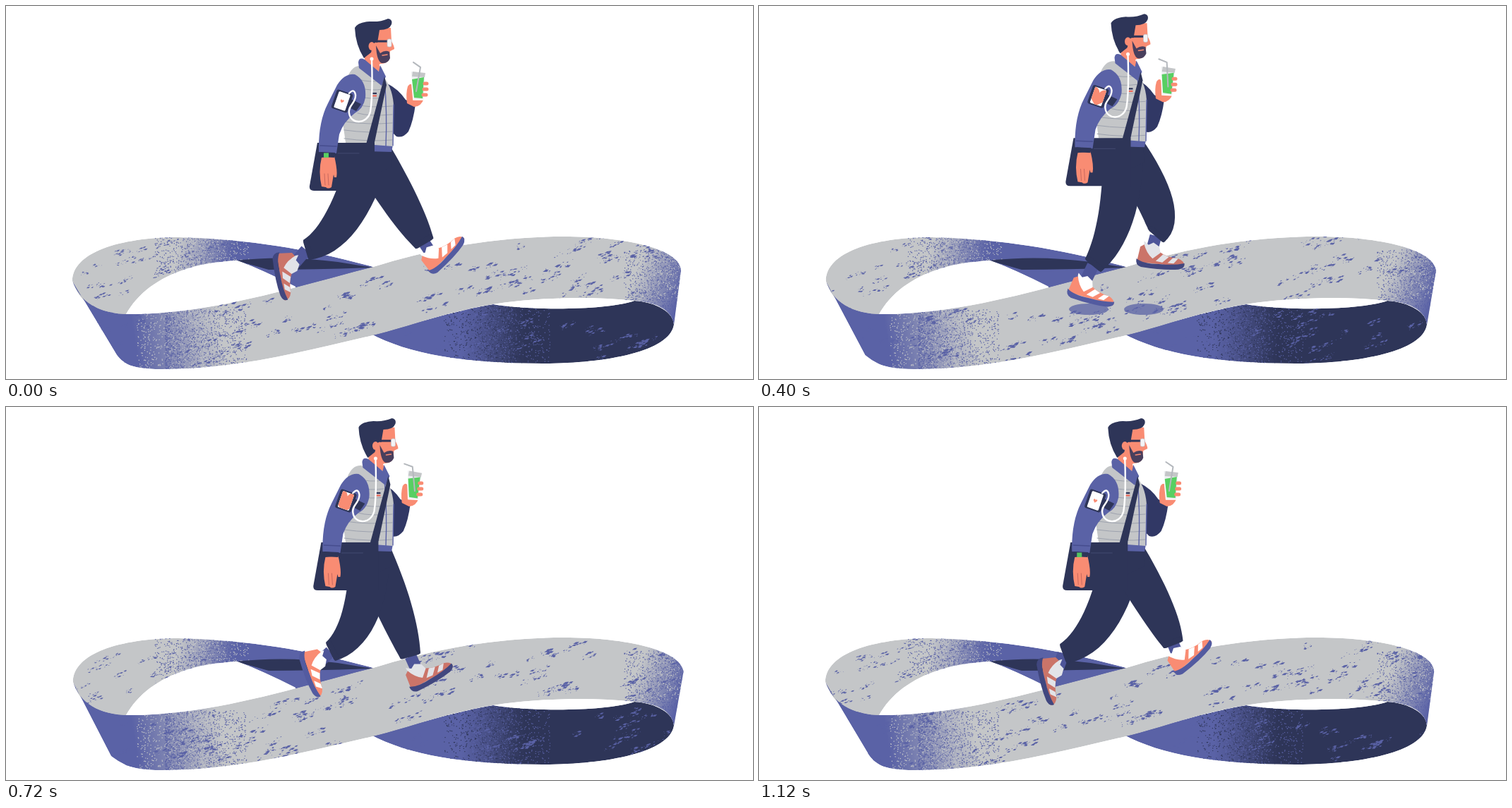
Write an HTML page that moves like this. It is 1058x529 px and loops after 1200 ms.

```html
<!DOCTYPE html>
<html lang="en">
<head>
<meta charset="utf-8">
<title>Endless walk</title>
<style>
  html, body { margin: 0; width: 100%; height: 100%; overflow: hidden; background: #fff; }
  svg { display: block; width: 100vw; height: 100vh; }
  .navy { fill: #2e3558; }
  .purple { fill: #5a62a6; }
  .skin { fill: #f98c73; }
  .line { fill: none; stroke-linecap: round; stroke-linejoin: round; }
</style>
</head>
<body>
<svg viewBox="0 0 1058 529">
  <defs>
    <clipPath id="backClip"><path class="back"/></clipPath>
    <clipPath id="underClip"><path class="under"/></clipPath>
    <clipPath id="frontClip"><path class="front"/></clipPath>
    <clipPath id="screen"><rect x="-8.5" y="-12" width="17" height="24" rx="1.5"/></clipPath>
    <linearGradient id="backFill" gradientUnits="userSpaceOnUse" x1="245" y1="335" x2="325" y2="350">
      <stop offset="0" stop-color="#c4c6c8"/><stop offset="1" stop-color="#5a62a6"/>
    </linearGradient>
    <linearGradient id="underFill" gradientUnits="userSpaceOnUse" x1="645" y1="0" x2="735" y2="0">
      <stop offset="0" stop-color="#5a62a6"/><stop offset="1" stop-color="#2e3558"/>
    </linearGradient>
    <linearGradient id="frontFill" gradientUnits="userSpaceOnUse" x1="185" y1="490" x2="305" y2="470">
      <stop offset="0" stop-color="#5a62a6"/><stop offset="1" stop-color="#c4c6c8"/>
    </linearGradient>
    <linearGradient id="rightFill" gradientUnits="userSpaceOnUse" x1="890" y1="385" x2="956" y2="412">
      <stop offset="0" stop-color="#5a62a6" stop-opacity="0"/><stop offset="1" stop-color="#5a62a6"/>
    </linearGradient>
  </defs>

  <g clip-path="url(#backClip)">
    <path class="back" fill="url(#backFill)"/>
    <g id="backMarks"/>
    <path class="navy" d="M326 361Q395 353 470 363L520 371Q440 374 372 374Z"/>
  </g>
  <g clip-path="url(#underClip)">
    <path class="under" fill="url(#underFill)"/>
    <g id="underMarks"/>
  </g>
  <g clip-path="url(#frontClip)">
    <path class="front" fill="url(#frontFill)"/>
    <rect x="860" y="320" width="110" height="150" fill="url(#rightFill)"/>
    <g id="frontMarks"/>
  </g>

  <g class="purple" opacity=".75">
    <ellipse class="shadow"/><ellipse class="shadow"/>
  </g>

  <g id="farArm">
    <path d="M540 110Q556 118 566 133L580 139Q577 163 570 178Q562 188 553 185L546 178Z" fill="#313865"/>
    <path class="skin" d="M569 114Q573 108 576 113L577 132L592 131Q588 143 578 143L568 138Q566 124 569 114Z"/>
    <g id="glass">
      <path d="M573 92L594 95L592 133H577Z" fill="#eceef0" stroke="#fff" stroke-width="1.5"/>
      <path d="M576 93L594 95L593 101L575 100Z" fill="#c4c6c8"/>
      <path d="M575 104L592 101L590 131L578 130Z" fill="#58cf62"/>
      <path id="straw" class="line" d="M577 80L587 87L581 121" stroke="#b4b8bd" stroke-width="2"/>
    </g>
    <g class="line" stroke="#f98c73" stroke-width="5">
      <path d="M593 110h3M592 118h4M591 126h4"/>
    </g>
  </g>

  <g id="legs"/>

  <g id="trunk">
    <path class="navy" d="M500 200L544 203L546 228L500 250Z"/>
    <path class="purple" d="M500 196L548 197L546 207L512 206Z"/>
    <path d="M484 100Q491 84 503 85L530 95Q547 112 549 140L548 199L481 194L477 165Z" fill="#c4c6c8"/>
    <g class="line" stroke="#9da2ae" stroke-width="1">
      <path id="quilt"/>
    </g>
    <path class="line" d="M536 105Q540 150 538 199M549 140L548 198" stroke="#5a62a6" stroke-width="1.4"/>
  </g>

  <g id="upper">
    <path class="skin" d="M508 68L530 66L528 82L534 96L508 82Z"/>
    <path class="purple" d="M499 80Q500 72 508 76L528 93L530 84L538 100L532 113L500 88Z"/>
    <path class="skin" d="M515 55L528 31L545 31L546 50Q550 57 550 61L544 64L543 74Q541 82 530 82L524 87L510 74Z"/>
    <path d="M524 56L530 67Q537 62 543 65L544 74Q541 82 532 81Q525 78 524 56Z" fill="#493f5d"/>
    <path class="line" d="M533 70l7 -1" stroke="#f98c73" stroke-width="1.5"/>
    <path class="navy" d="M494 31Q498 23 515 22Q530 23 541 18Q548 19 546 26Q543 34 529 34L526 52Q521 50 519 58L517 66L507 74Q495 55 494 31Z"/>
    <ellipse class="skin" cx="518" cy="57" rx="4.5" ry="6"/>
    <path class="line" d="M525 50H542" stroke="#2e3558" stroke-width="3"/>
    <rect x="540" y="47" width="6" height="11" rx="2" fill="#f4f4f6" stroke="#bfc3cf" stroke-width=".7"/>

    <path d="M518 124h7" stroke="#2e3558" stroke-width="2.2"/>
    <path d="M517 127.5h8" stroke="#f2604f" stroke-width="2"/>
    <path class="navy" d="M441 194H522V262H436Q429 262 430 255Z"/>
    <path class="line" d="M470 209H500" stroke="#434a70" stroke-width="1"/>
    <path class="navy" d="M536 100L539 112L521 198L510 196Z"/>

    <path class="skin" d="M447 215L465 213Q470 234 468 243L465 243L464 239L461 257Q456 260 453 257L447 256Q442 235 447 215Z"/>
    <path class="line" d="M451 238L452 254M456 238L457 254" stroke="#c9695f" stroke-width="1"/>
    <path class="purple" d="M469 112Q480 95 494 97Q511 106 509 130Q506 146 494 152Q478 164 472 182L468 209L443 207Q442 165 456 138Z"/>
    <path class="line" d="M445 198L468 199" stroke="#464d8e" stroke-width="1.5"/>
    <path class="navy" d="M445 207L466 208L465 215L446 214Z"/>
    <rect id="watch" x="450" y="208.5" width="7" height="6.5" fill="#58cf62"/>
    <path class="navy" d="M484 130L503 139L496 149L482 142Z"/>
    <g transform="translate(476 135) rotate(19)">
      <rect class="navy" x="-12" y="-14" width="24" height="28" rx="3"/>
      <g clip-path="url(#screen)">
        <rect x="-9" y="-13" width="18" height="26" fill="#fff"/>
        <path id="heart" class="skin" d="M0 .5C-.2 .3-.5 .1-.5-.15C-.5-.5-.1-.5 0-.2C.1-.5.5-.5.5-.15C.5 .1 .2 .3 0 .5Z"/>
      </g>
    </g>
    <path class="line" d="M518 76C519 105 519 132 516 150C511 169 488 168 486 152C484 141 496 138 495 126Q493 116 486 124" stroke="#fff" stroke-width="2.4"/>
    <circle cx="518" cy="75" r="2.5" fill="#fff"/>
  </g>
</svg>

<script>
const LOOP = 1200, STEP = 80, LAP = 720;
const $ = id => document.getElementById(id);

function add(parent, tag, attrs = {}) {
  const node = document.createElementNS('http://www.w3.org/2000/svg', tag);
  for (const k in attrs) node.setAttribute(k, attrs[k]);
  return parent.appendChild(node);
}
const setD = (cls, d) => document.querySelectorAll('.' + cls).forEach(n => n.setAttribute('d', d));
const move = (node, x, y, rest = '') => node.setAttribute('transform', `translate(${x} ${y}) ${rest}`);
const wrap = (v, n) => ((v % n) + n) % n;

let seed = 7;
function rnd() {
  seed = (seed * 16807) % 2147483647;
  return seed / 2147483647;
}
const spread = n => (rnd() - .5) * n;

// Stippled shading: n specks placed by at()
function grain(parent, n, fill, at) {
  let d = '';
  for (let i = 0; i < n; i++) {
    const [x, y] = at();
    d += `M${x.toFixed(1)} ${y.toFixed(1)}h1.2v1.2h-1.2z`;
  }
  add(parent, 'path', { d, fill });
}

const GREY = '#c4c6c8', PURPLE = '#5a62a6', NAVY = '#2e3558';
const back = $('backMarks'), under = $('underMarks'), front = $('frontMarks');
grain(back, 700, PURPLE, () => [320 - 110 * rnd() ** 1.6, 325 + 55 * rnd()]);
grain(back, 350, GREY, () => [260 + 85 * rnd() ** 1.5, 325 + 50 * rnd()]);
grain(under, 800, NAVY, () => [730 - 110 * rnd() ** 1.5, 415 + 95 * rnd()]);
grain(under, 700, PURPLE, () => [660 + 110 * rnd() ** 1.5, 415 + 95 * rnd()]);
grain(front, 1300, PURPLE, () => [225 + 115 * rnd() ** 1.6, 430 + 90 * rnd()]);
grain(front, 700, GREY, () => [285 - 100 * rnd() ** 1.6, 430 + 90 * rnd()]);
grain(front, 900, PURPLE, () => [960 - 85 * rnd() ** 1.4, 345 + 85 * rnd()]);
grain(front, 350, GREY, () => [895 + 60 * rnd() ** 1.4, 345 + 70 * rnd()]);

// A worn patch: ragged flakes strewn along a slant, most of them tiny
function flakes() {
  let d = '';
  const len = 12 + 40 * rnd() ** 2, count = 6 + len / 3;
  for (let i = 0; i < count; i++) {
    const x = spread(len), y = spread(8) - x * .35, r = rnd() ** 3, w = 1 + 7 * r, h = .7 + 2 * r;
    d += `M${x.toFixed(1)} ${y.toFixed(1)}l${(w * .5).toFixed(1)} ${(-h).toFixed(1)}` +
      `l${(w * .6).toFixed(1)} ${(-h * .2).toFixed(1)}l${(-w * .4).toFixed(1)} ${(h * 1.2).toFixed(1)}z`;
  }
  return d;
}

const marks = [];
function scatter(parent, n, lap, copies, place) {
  for (let i = 0; i < n; i++) {
    const d = flakes(), x = rnd() * lap, v = spread(2);
    for (let c = 0; c < copies; c++)
      marks.push({ node: add(parent, 'path', { d, fill: PURPLE }), x, v, c, place });
  }
}
scatter(front, 64, LAP, 2, (m, p) => {
  const x = 100 + wrap(m.x - LAP * p, LAP) + LAP * m.c;
  return [x, 420 - 50 * Math.tanh((x - 520) / 130) + m.v * 42, 1];
});
scatter(back, 24, 240, 1, (m, p) => {
  const x = 95 + wrap(m.x + 240 * p, 240);
  return [x, 346 + 55 * ((330 - x) / 220) ** 2 + m.v * 32, .75];
});
scatter(under, 30, 400, 1, (m, p) => [560 + wrap(m.x + 400 * p, 400), 464 + m.v * 40, .9]);

// phase, knee x y, cuff x y, ankle x y, foot angle
const GAIT = [
  [0, 561, 283, 593, 337, 601, 349, -45],
  [40, 561, 285, 592, 340, 601, 355, -44],
  [200, 540, 290, 554, 367, 562, 390, -14],
  [240, 533, 290, 540, 368, 545, 394, -12],
  [360, 509, 294, 489, 371, 480, 399, 0],
  [400, 505, 300, 473, 368, 462, 391, 16],
  [520, 482, 303, 431, 350, 423, 372, 77],
  [600, 476, 303, 425, 346, 407, 367, 80],
  [640, 477, 303, 429, 348, 415, 367, 82],
  [800, 522, 294, 490, 346, 476, 353, 60],
  [840, 534, 288, 508, 338, 495, 347, 54],
  [960, 560, 279, 552, 325, 545, 341, 27],
  [1000, 562, 281, 562, 326, 557, 344, 6],
  [1120, 561, 283, 587, 337, 592, 349, -41]
];
function pose(phase) {
  let i = GAIT.length - 1;
  while (GAIT[i][0] > phase) i--;
  const a = GAIT[i], b = GAIT[(i + 1) % GAIT.length];
  const k = (phase - a[0]) / ((b[0] || LOOP) - a[0]);
  return a.slice(1).map((v, j) => v + (b[j + 1] - v) * k);
}

// Tapered trouser leg: outline around a curve from hip through knee to cuff
function trouser(hx, hy, kx, ky, cx, cy) {
  const qx = 2 * kx - (hx + cx) / 2, qy = 2 * ky - (hy + cy) / 2;
  const left = [], right = [];
  for (let i = 0; i <= 16; i++) {
    const t = i / 16, s = 1 - t;
    const x = s * s * hx + 2 * s * t * qx + t * t * cx, y = s * s * hy + 2 * s * t * qy + t * t * cy;
    const dx = s * (qx - hx) + t * (cx - qx), dy = s * (qy - hy) + t * (cy - qy);
    const w = (28.5 - 14 * t * t) / Math.hypot(dx, dy);
    left.push(`${(x + dy * w).toFixed(1)} ${(y - dx * w).toFixed(1)}`);
    right.unshift(`${(x - dy * w).toFixed(1)} ${(y + dx * w).toFixed(1)}`);
  }
  return 'M' + left.concat(right).join('L') + 'Z';
}

function makeLeg(offset, upper, light, sole) {
  const g = add($('legs'), 'g');
  const sock = add(g, 'path', { stroke: '#4e5598', 'stroke-width': 17 });
  const shoe = add(g, 'g');
  const part = (fill, d) => add(shoe, 'path', { fill, d });
  part(upper, 'M-21 22L-18 -1L-12 -5L10 3Q22 11 40 11Q51 14 50 22Z');
  part(light, 'M-13 -10L-6 -5L1 -9L10 -4L13 5L2 15Q-8 8 -13 -6Z');
  part(light, 'M17 7L26 10L17 19L7 18Z');
  part(light, 'M32 11L40 11L34 19L25 19Z');
  part(sole, 'M-22 17Q-12 24 12 22Q34 22 50 17Q52 24 42 27Q20 31 -14 29Q-23 27 -22 17Z');
  const cloth = add(g, 'path', { class: 'navy' });
  const cuff = add(g, 'path', { class: 'navy', stroke: NAVY, 'stroke-width': 8, 'stroke-linecap': 'round' });
  return (t, dy) => {
    const [kx, ky, cx, cy, ax, ay, turn] = pose(wrap(t + offset, LOOP));
    const hx = 516, hy = 207 + dy;
    sock.setAttribute('d', `M${cx} ${cy}L${ax} ${ay}`);
    move(shoe, ax, ay, `rotate(${turn}) scale(.95)`);
    cloth.setAttribute('d', trouser(hx, hy, kx, ky, cx, cy));
    const ex = cx - 2 * kx + (hx + cx) / 2, ey = cy - 2 * ky + (hy + cy) / 2, n = 11 / Math.hypot(ex, ey);
    const bx = cx - ex * n * .3, by = cy - ey * n * .3;
    cuff.setAttribute('d', `M${bx - ey * n} ${by + ex * n}L${bx + ey * n} ${by - ex * n}`);
  };
}
const legs = [
  makeLeg(600, '#cb7469', '#e2e3e8', '#41477f'),
  makeLeg(0, '#f98c73', '#fff', '#535ba0')
];

let rows = '';
for (let y = 104; y < 192; y += 12) rows += `M${y < 160 ? 498 : 479} ${y}Q515 ${y + 5} ${y < 130 ? 535 : 547} ${y + 2}`;
$('quilt').setAttribute('d', rows);

// The band flexes slightly as it turns; u runs 0..1
function band(u) {
  const r = 956 + 4 * u, l = 157 - 9 * u, e = 94 + u;
  setD('back', `M${e} 390C${e} 350 160 328 245 328C340 330 430 345 520 370L515 382L410 402L410 398Q365 375 328 361C250 364 195 392 170 437L175 439C130 440 105 422 ${e} 390Z`);
  setD('under', 'M515 464C570 455 620 435 690 423C740 432 850 432 890 418C922 420 946 435 946 452C940 490 850 507 760 507C650 507 570 494 515 464Z');
  setD('front', `M${e} 390C104 418 130 437 175 437C290 437 400 401 520 370C600 345 690 327 790 327C880 327 955 345 ${r} 375` +
    `L946 452C944 432 922 420 890 418C820 410 740 415 690 423C620 435 570 455 520 467C420 490 330 515 220 515C180 515 168 509 ${l} 495Z`);
}

const shadows = document.querySelectorAll('.shadow');
function shade(t) {
  const gap = Math.abs(t % 600 - 300), one = gap < 80;
  shadows.forEach((n, i) => {
    const rx = gap > 160 ? 0 : one ? (i ? 0 : 57) : 28 - (gap - 100) * .25;
    n.setAttribute('cx', one ? 505 : 506 + (i ? 1 : -1) * (39 + (gap - 100) * .25));
    n.setAttribute('cy', 430);
    n.setAttribute('rx', rx);
    n.setAttribute('ry', one ? 9 : rx * .29);
  });
}

function draw(t) {
  const u = (1 - Math.cos(2 * Math.PI * t / LOOP)) / 2;
  const dy = -4 + 4 * Math.cos(2 * Math.PI * (t - 20) / 600);
  band(u);
  for (const m of marks) {
    const [x, y, s] = m.place(m, t / LOOP);
    move(m.node, x.toFixed(1), y.toFixed(1), `scale(${s})`);
  }
  shade(t);
  legs.forEach(leg => leg(t, dy));
  move($('trunk'), 0, dy);
  move($('upper'), 6 * u, dy);
  move($('farArm'), -8 * u, dy);
  $('glass').setAttribute('transform', `rotate(${4 * u} 584 132)`);
  move($('straw'), 5 * u, 0, `rotate(${-21 * u} 581 121)`);
  $('heart').setAttribute('transform', `scale(${5 + 33 * u ** 1.3})`);
  $('watch').setAttribute('opacity', Math.max(0, 1 - 1.7 * u));
}

function tick() {
  draw(Math.floor(performance.now() % LOOP / STEP) * STEP);
  requestAnimationFrame(tick);
}
tick();
</script>
</body>
</html>
```
